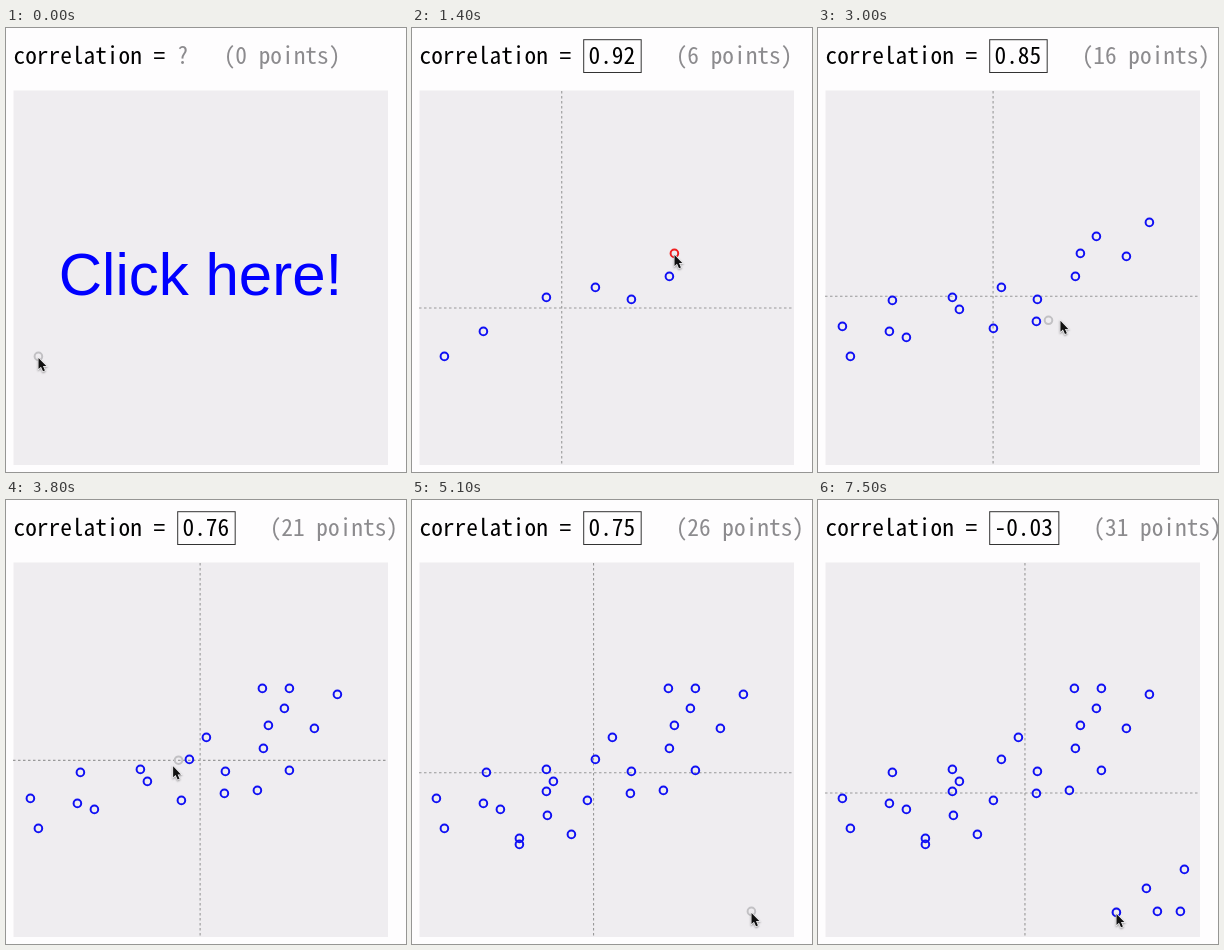
Write an HTML page with a canvas that moves like this. It is 400 px wide and 444 px high and loops after 8.2 s.

```html
<!DOCTYPE html>
<html lang="en">
<head>
<meta charset="utf-8">
<title>Correlation</title>
<style>
  html, body { margin: 0; width: 100%; height: 100%; overflow: hidden; background: #fefdfe; }
  svg, canvas { position: absolute; left: 0; top: 0; width: 400px; height: 444px; }
  .mono {
    font-family: "Noto Sans Mono CJK JP", "Noto Sans Mono CJK SC", "Noto Sans Mono", monospace;
    white-space: pre;
  }
  #count { fill: #8c8b8e; }
  #invite { font: 60px "Liberation Sans", Arial, sans-serif; fill: #00f; text-anchor: middle; }
</style>
</head>
<body>
<svg viewBox="0 0 400 444">
  <rect x="7.5" y="62.5" width="374.5" height="374.5" fill="#efedf0"/>
  <text class="mono" x="7.5" y="36.2">correlation =</text>
  <rect id="box" x="171.7" y="11.7" height="32.8" fill="none" stroke="#333"/>
  <text id="value" class="mono" y="36.2"></text>
  <text id="count" class="mono" y="36.2"></text>
  <text id="invite" x="194.5" y="267">Click here!</text>
</svg>
<canvas width="400" height="444"></canvas>
<script>
const LOOP = 8200, STEP = 100, END = 6600;
const PRESS = 80, LEAD = 15; // ms the button is held, ms the arrow runs ahead of its ring
const CELL = 11.67, PAD = 5.5, LEFT = 171;

// each burst of clicks is evenly spaced between its first and last moment
const bursts = [
  { from: 80, to: 650, at: "32,328 71,303 134,269" },
  { from: 985, to: 1900, at: "183,259 219,271 257,248 262,225 278,208 308,228 331,194" },
  { from: 2270, to: 3680, at: "175,300 141,281 88,309 24,298 74,272 218,293 251,290 283,270 283,188 256,188 200,237" },
  { from: 4028, to: 4740, at: "134,291 135,315 107,338 107,344 159,334" },
  { from: 5180, to: 5700, at: "339,411 362,411 366,369" },
  { from: 6264, to: 6590, at: "328,388 298,412" }
];

const clicks = bursts.flatMap(({ from, to, at }) =>
  at.split(" ").map((pair, i, all) => {
    const [x, y] = pair.split(",").map(Number);
    return { x, y, t: from + (to - from) * i / (all.length - 1) };
  }));

const $ = id => document.getElementById(id);
const ctx = document.querySelector("canvas").getContext("2d");
const sum = (list, f) => list.reduce((s, p) => s + f(p), 0);
const smooth = u => u * u * (3 - 2 * u);

function fitMono() {
  const nodes = document.querySelectorAll(".mono");
  ctx.font = "100px " + getComputedStyle(nodes[0]).fontFamily;
  const size = 100 * CELL / ctx.measureText("0").width;
  nodes.forEach(n => n.style.fontSize = size + "px");
}

// glide from the latest click to the next one, arriving in time to press
function pointer(t) {
  const n = clicks.filter(c => c.t <= t).length;
  const b = clicks[Math.min(n, clicks.length - 1)];
  const a = clicks[n - 1] || b;
  const u = a === b ? 1 : Math.min(1, (t - a.t) / (b.t - PRESS - a.t));
  const k = smooth(u);
  return [a.x + (b.x - a.x) * k, a.y + (b.y - a.y) * k];
}

function stats(pts) {
  const n = pts.length;
  const mx = sum(pts, p => p.x) / n, my = sum(pts, p => p.y) / n;
  const xy = sum(pts, p => (p.x - mx) * (my - p.y));
  const xx = sum(pts, p => (p.x - mx) ** 2);
  const yy = sum(pts, p => (p.y - my) ** 2);
  return { mx, my, r: xy / Math.sqrt(xx * yy) };
}

function ring(x, y, color) {
  ctx.strokeStyle = color;
  ctx.lineWidth = 2;
  ctx.beginPath();
  ctx.arc(x + 0.4, y + 0.4, 3.8, 0, 7);
  ctx.stroke();
}

function meanLines(mx, my) {
  const x = mx + 0.4, y = my + 0.4;
  ctx.strokeStyle = "#999";
  ctx.lineWidth = 1.1;
  ctx.setLineDash([2.5, 2.5]);
  ctx.beginPath();
  ctx.moveTo(x, 63);
  ctx.lineTo(x, 437);
  ctx.moveTo(7, y);
  ctx.lineTo(382, y);
  ctx.stroke();
  ctx.setLineDash([]);
}

function arrow(x, y) {
  ctx.save();
  ctx.translate(x, y);
  const shape = new Path2D("M0 0V11L2.5 8.8L4.5 13.3L6.4 12.4L4.5 8.1H7.8Z");
  ctx.shadowColor = "rgba(0,0,0,.4)";
  ctx.shadowBlur = 2;
  ctx.shadowOffsetY = 1;
  ctx.lineWidth = 1.4;
  ctx.strokeStyle = "#f4f3f5";
  ctx.stroke(shape);
  ctx.shadowColor = "transparent";
  ctx.fillStyle = "#111";
  ctx.fill(shape);
  ctx.restore();
}

function header(n, r) {
  const known = n > 1;
  const text = known ? r.toFixed(2) : "?";
  const width = text.length * CELL + (known ? 2 * PAD : 0);
  $("value").textContent = text;
  $("value").setAttribute("x", LEFT + (known ? PAD : 0));
  $("value").setAttribute("fill", known ? "#000" : "#8c8b8e");
  $("box").setAttribute("width", width - 0.2);
  $("box").style.display = known ? "" : "none";
  $("count").textContent = `(${n} points)`;
  $("count").setAttribute("x", LEFT + width + 3 * CELL);
  $("invite").style.display = n ? "none" : "";
}

function draw(t) {
  const pts = clicks.filter(c => c.t <= t);
  const { mx, my, r } = stats(pts);
  header(pts.length, r);
  ctx.clearRect(0, 0, 400, 444);
  if (pts.length) meanLines(mx, my);
  const pressed = clicks.some(c => t < c.t && t > c.t - PRESS);
  const [gx, gy] = pointer(t);
  if (!pressed) ring(gx, gy, "#c2c1c4");
  pts.forEach(p => ring(p.x, p.y, "#1010f4"));
  if (pressed) ring(gx, gy, "#f02020");
  const [cx, cy] = pointer(t + LEAD);
  arrow(cx + 0.5, cy + 2);
}

let start, last = -1;
function tick(now) {
  start ??= now;
  const t = Math.min(END, Math.floor((now - start) % LOOP / STEP) * STEP);
  if (t !== last) draw(last = t);
  requestAnimationFrame(tick);
}

fitMono();
draw(0);
requestAnimationFrame(tick);
</script>
</body>
</html>
```
